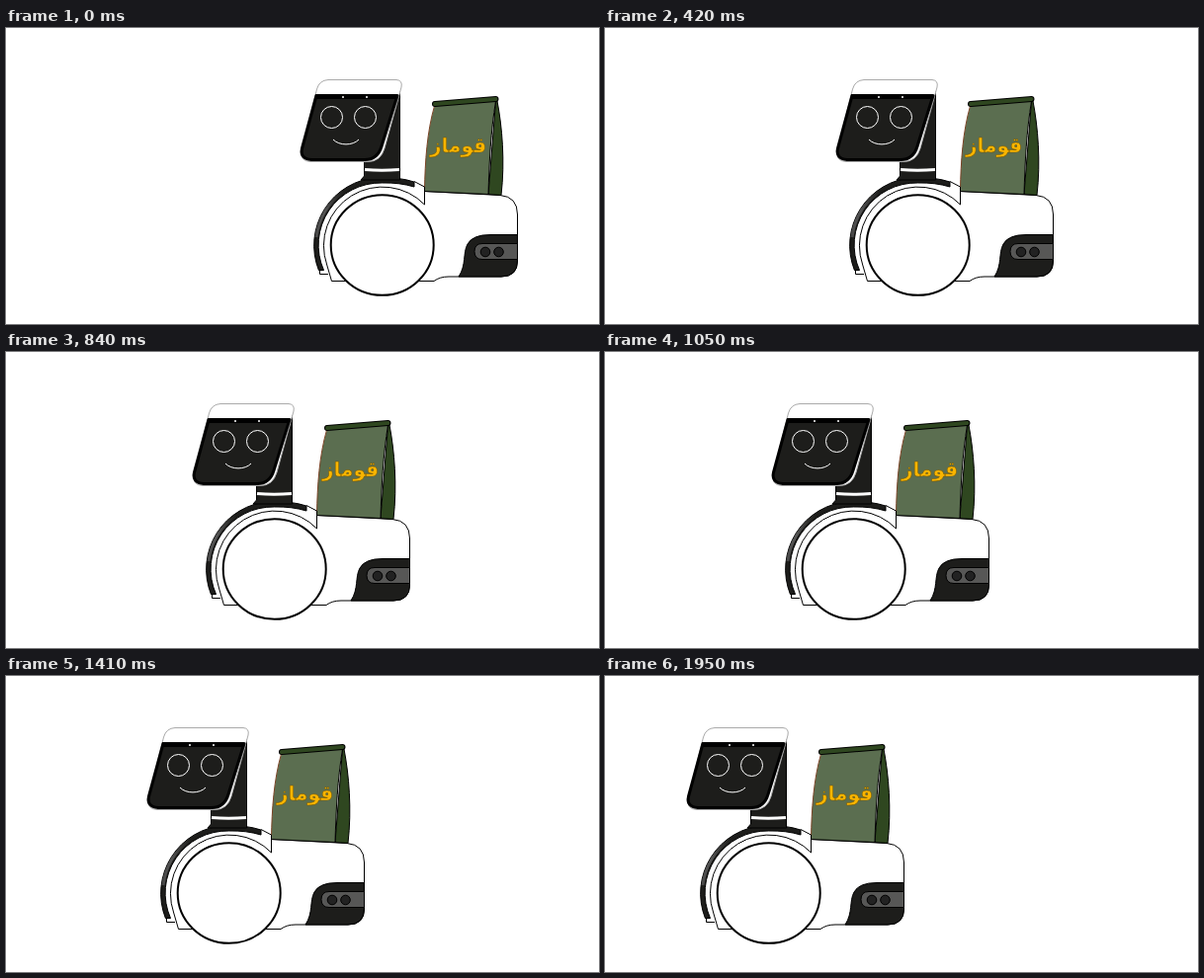
These frames come from a looping animation (600 px wide and 300 px high, 2.01 s). An HTML page:

```html
<!DOCTYPE html>
<html lang="ar">
<head>
<meta charset="utf-8">
<style>
html, body { margin: 0; width: 100%; height: 100%; overflow: hidden; background: #fff; }
svg { display: block; width: 100%; height: 100%; }
text { font: bold 20px "DejaVu Sans", sans-serif; }
</style>
</head>
<body>
<svg viewBox="0 0 600 300">
<defs>
  <linearGradient id="shine" gradientUnits="userSpaceOnUse" x1="313" y1="212" x2="341" y2="165">
    <stop offset="0" stop-color="#484848"/>
    <stop offset=".5" stop-color="#555"/>
    <stop offset="1" stop-color="#1d1d1b"/>
  </linearGradient>
</defs>
<g id="robot" fill="none" stroke="#000" stroke-linejoin="round">
  <!-- body -->
  <path fill="#fff" d="M423.5 165.5L500 169.5Q517.5 171 517.5 189V236Q517.5 252 501 252H448Q439 252 433 256.5H329.5L324.7 240A59.5 59.5 0 0 1 423.5 179Z"/>
  <path fill="#1d1d1b" d="M458 252C466 240 462 228 467 219Q472 209.5 490 209.5H517.5V236Q517.5 252 501 252Z"/>
  <path fill="#575756" d="M517.5 218.5H482Q474 218.5 474 226.5T482 234.5H517.5Z"/>
  <g fill="#222"><circle cx="485" cy="227" r="4.8"/><circle cx="498.5" cy="227" r="4.8"/></g>

  <!-- bag -->
  <path fill="#2f4720" d="M495.5 74H497C502 100 505 135 501 169.5L488 168.5Z"/>
  <path fill="#5b6e50" stroke="none" d="M434 78L495.5 73C490.5 105 489 135 488 168.5L423.5 165.5C424 135 426 105 434 78Z"/>
  <path d="M495.5 74C490.5 105 489 135 488 168.5L423.5 165.5"/>
  <path stroke="#7a4325" d="M423.5 165C424 135 426 105 433.5 79"/>
  <g stroke-linecap="round">
    <path stroke-width="6" d="M434 77L495.5 72"/>
    <path stroke-width="4" stroke="#2f4720" d="M434 77L495.5 72"/>
  </g>
  <text x="457.5" y="126" text-anchor="middle" direction="rtl" fill="#f9b500" stroke="#7a5a00" stroke-width=".5">قوماز</text>

  <!-- fender -->
  <path d="M317.5 245V249.5H326M413 155.5L423.5 161V179"/>
  <path fill="#1d1d1b" d="M316.4 245.5A69 69 0 0 1 376 151.5Q398 151 413 156V161Q398 156.500 380.7 157A63 63 0 0 0 321.5 245.5Z"/>
  <path stroke="url(#shine)" stroke-width="3" d="M314 212A67 67 0 0 1 341 166"/>

  <!-- neck -->
  <path fill="#1d1d1b" d="M362.5 150V110L398.5 60V154H359Z"/>
  <path stroke="#fff" stroke-width="3" d="M363 143.5Q380 145 398 143.5"/>

  <!-- head -->
  <path fill="#fff" stroke="#aaa" d="M326 52.5H395Q401.5 53 400 60L383 122Q379 135.5 366 135.5H308Q297 135 299 124L314.5 62Q317 53 326 52.5Z"/>
  <path fill="#1d1d1b" stroke-width="3" d="M314 68.5H396L380 120Q376 133.5 363 133.5H309Q297 132.5 299.5 122Z"/>
  <path stroke-width="5" d="M313 69.5H396"/>
  <g fill="#fff" stroke="none"><circle cx="341" cy="70" r="1"/><circle cx="365" cy="70" r="1"/></g>
  <g stroke="#fff">
    <circle cx="329.5" cy="90.5" r="11"/><circle cx="363.5" cy="90.5" r="11"/>
    <path d="M331 113C337 119.500 351 119.500 357 113"/>
  </g>

  <ellipse cx="380.7" cy="220" rx="52" ry="50.8" fill="#fff" stroke-width="2"/>
</g>
</svg>
<script>
const LOOP = 2010, TICK = 30;
// Each leg starts at a tick and a distance, and moves once every `hold` ticks
const legs = [
  [1, 0, 1], [8, 40, 1], [18, 80, 2], [20, 83, 1], [28, 109, 1],
  [35, 129, 2], [37, 132, 2], [47, 155, 2], [53, 175, 3], [65, 215, 3],
];
const robot = document.getElementById("robot");

function distance(tick) {
  const i = legs.findLastIndex(([start]) => start <= tick);
  if (i < 0) return 0;
  const [start, from, hold] = legs[i];
  const [end, to] = legs[i + 1] ?? [start + hold, from];
  const moved = Math.floor((tick - start) / hold) * hold;
  return Math.round(from + (to - from) * moved / (end - start));
}

function draw() {
  const tick = performance.now() % LOOP / TICK;
  robot.setAttribute("transform", `translate(${-distance(tick)})`);
  requestAnimationFrame(draw);
}
draw();
</script>
</body>
</html>
```
